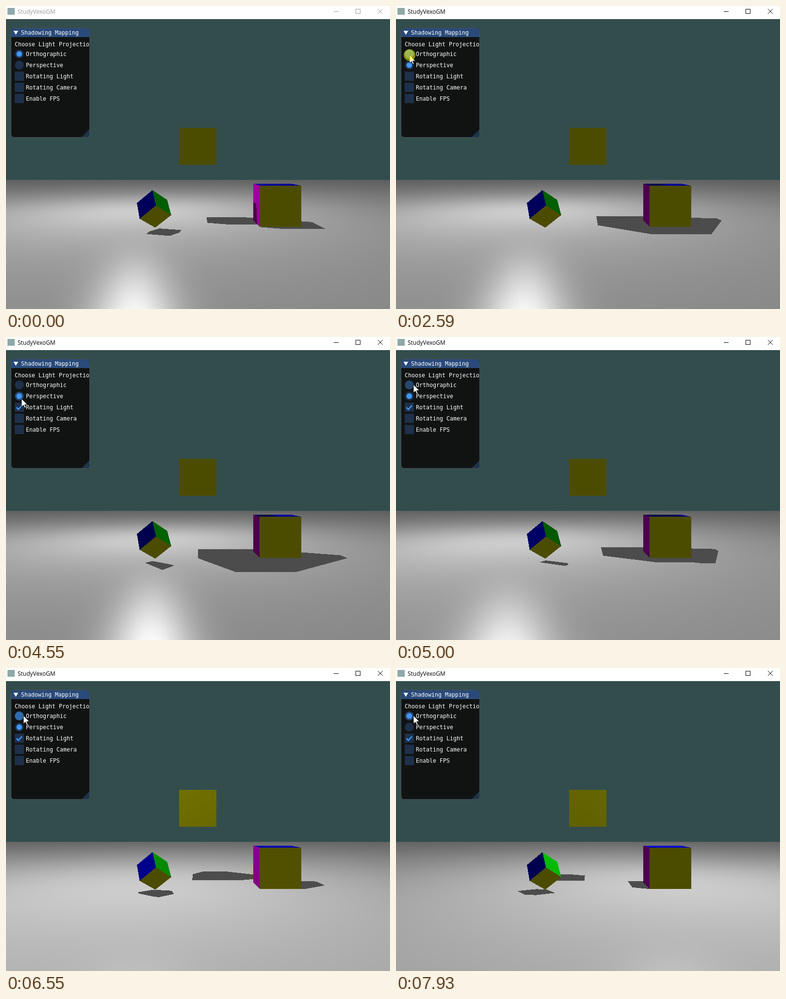
These frames come from a looping animation (792 px wide and 624 px high, 8 s). An HTML page with a canvas:

```html
<!DOCTYPE html>
<html lang="en">
<head>
<meta charset="utf-8">
<title>Shadow demo</title>
<style>
  html, body { margin: 0; width: 100%; height: 100%; overflow: hidden; background: #fff; }
  canvas, svg { position: absolute; left: 0; top: 0; display: block; }
  canvas { top: 27px; }
  .ui text { font: 11.63px "DejaVu Sans Mono", "Liberation Mono", monospace; fill: #fff; white-space: pre; }
  .ui .caption { font: 12px "Open Sans", "Noto Sans", sans-serif; fill: inherit; }
</style>
</head>
<body>
<canvas id="scene" width="792" height="597"></canvas>
<svg class="ui" width="792" height="624" viewBox="0 0 792 624">
  <defs>
    <clipPath id="inside"><rect x="11" y="46" width="160" height="224"/></clipPath>
    <clipPath id="rounded"><rect x="11" y="46" width="161" height="224" rx="6"/></clipPath>
  </defs>
  <rect width="792" height="27" fill="#fff"/>
  <rect x="3" y="4" width="15" height="14" fill="#8fa9a9"/>
  <text id="caption" class="caption" x="24" y="16">StudyVexoGM</text>
  <g id="buttons" fill="none" stroke-width="1">
    <path d="M676 11.5h10"/>
    <rect x="721.5" y="6.5" width="9" height="9"/>
    <path d="M767 6l10 10M777 6l-10 10"/>
  </g>

  <rect x="10.5" y="45.5" width="162" height="225" rx="6.5" fill="#111312" stroke="#494d57"/>
  <g clip-path="url(#rounded)">
    <rect x="11" y="46" width="161" height="18" fill="#294a7a"/>
    <path d="M172 254v16h-16z" fill="#1e344c"/>
  </g>
  <path d="M15.5 51h9.6l-4.8 8.3z" fill="#fff"/>
  <g clip-path="url(#inside)">
    <text x="31" y="59">Shadowing Mapping</text>
    <text x="18" y="83">Choose Light Projection</text>
  </g>
  <g id="rows"></g>
  <circle id="dot" cx="27.4" r="5.8" fill="#4296fa"/>
  <path id="tick" d="M21.5 145l4 4.2 7.5-8.4" fill="none" stroke="#4296fa" stroke-width="2.6"/>
  <path id="arrow" d="M0 0V17L4 13.2 6.6 19 9 18 6.5 12.2H12Z" fill="#fff" stroke="#000" stroke-width=".8"/>
  <circle id="ring" r="12" fill="#ff0" fill-opacity=".52"/>
</svg>

<script>
const LOOP = 8000, W = 792, H = 597, TOP = 27;
const $ = id => document.getElementById(id);

// ---------- scene: three boxes on a floor at y = -0.5 ----------
const FOCAL = 724.3, MID_X = 395.5, MID_Y = 327.4, FLOOR = -0.5;
const eye = [0, 1, 10];
const straight = [[1, 0, 0], [0, 1, 0], [0, 0, 1]];

// Axes turned by an angle about (1,0,1)
function turned(angle) {
  const c = Math.cos(angle), a = (1 + c) / 2, b = (1 - c) / 2, s = Math.sin(angle) * Math.SQRT1_2;
  return [[a, s, b], [-s, c, s], [b, -s, a]];
}
const boxes = [
  { at: [0, 1.5, 0], half: 0.5, axes: straight },
  { at: [2, 0, 1], half: 0.5, axes: straight },
  { at: [-1, 0, 2], half: 0.25, axes: turned(Math.PI / 3) }
];
// Colours by axis: [negative side, positive side]
const paint = [[[1, 0, 1], [0, 1, 0]], [[0, 1, 1], [0, 0, 1]], [[1, 0, 0], [1, 1, 0]]];

const dot3 = (a, b) => a[0] * b[0] + a[1] * b[1] + a[2] * b[2];
const unit = v => { const n = Math.hypot(v[0], v[1], v[2]); return [v[0] / n, v[1] / n, v[2] / n]; };

let tNear, tFar, hitAxis;
// Ray against box; the direction has unit length
function hit(box, px, py, pz, dx, dy, dz) {
  const mx = box.at[0] - px, my = box.at[1] - py, mz = box.at[2] - pz, h = box.half;
  const along = mx * dx + my * dy + mz * dz;
  if (mx * mx + my * my + mz * mz - along * along > 3 * h * h) return false;
  tNear = -1e9; tFar = 1e9;
  for (let i = 0; i < 3; i++) {
    const a = box.axes[i];
    const e = a[0] * mx + a[1] * my + a[2] * mz;
    const f = a[0] * dx + a[1] * dy + a[2] * dz || 1e-9;
    const k = h / Math.abs(f), m = e / f;
    if (m - k > tNear) { tNear = m - k; hitAxis = i; }
    if (m + k < tFar) tFar = m + k;
    if (tNear > tFar) return false;
  }
  return true;
}

const ctx = $("scene").getContext("2d");
const image = ctx.createImageData(W, H);
const bits = image.data;
for (let i = 0; i < bits.length; i += 4) {
  bits[i] = 51; bits[i + 1] = bits[i + 2] = 77; bits[i + 3] = 255;
}

// The camera is fixed, so visible points are found once
const surfaces = [{ normal: [0, 1, 0], color: [1, 1, 1] }];
boxes.forEach(b => b.axes.forEach((a, i) => [-1, 1].forEach((s, side) =>
  surfaces.push({ normal: a.map(v => v * s), color: paint[i][side] }))));

const spots = new Float32Array(W * H * 3);
const kinds = new Int8Array(W * H).fill(-1);
const firstRow = 248 - TOP;

function findVisible() {
  for (let y = firstRow; y < H; y++) for (let x = 0; x < W; x++) {
    const d = unit([x + 0.5 - MID_X, MID_Y - (y + TOP + 0.5), -FOCAL]);
    let best = 1e9, kind = -1;
    if (d[1] < 0) {
      const t = (FLOOR - eye[1]) / d[1];
      if (eye[2] + t * d[2] > -25) { best = t; kind = 0; }
    }
    boxes.forEach((b, i) => {
      if (hit(b, ...eye, ...d) && tNear < best) {
        best = tNear;
        kind = 1 + i * 6 + hitAxis * 2 + (dot3(b.axes[hitAxis], d) < 0 ? 1 : 0);
      }
    });
    if (kind < 0) continue;
    const n = y * W + x;
    kinds[n] = kind;
    for (let k = 0; k < 3; k++) spots[n * 3 + k] = eye[k] + best * d[k];
  }
}

function render(light, perspective) {
  const [lx, ly, lz] = light, sun = unit(light), FAR = 7.5, SPREAD = Math.tan(Math.PI / 8);
  const f = sun.map(v => -v), r = unit([-f[2], 0, f[0]]);
  const u = [-r[2] * f[1], r[2] * f[0] - r[0] * f[2], r[0] * f[1]];

  function shaded(px, py, pz, tx, ty, tz) {
    const vx = px - lx, vy = py - ly, vz = pz - lz;
    const depth = vx * f[0] + vy * f[1] + vz * f[2];
    if (depth > FAR) return false;
    const limit = perspective ? SPREAD * depth : 10;
    if (Math.abs(vx * r[0] + vz * r[2]) > limit) return false;
    if (Math.abs(vx * u[0] + vy * u[1] + vz * u[2]) > limit) return false;
    for (let i = 0; i < 3; i++)
      if (hit(boxes[i], px, py, pz, tx, ty, tz) && tFar > 0.04) return true;
    return false;
  }

  for (let n = firstRow * W; n < W * H; n++) {
    if (kinds[n] < 0) continue;
    const { normal: m, color } = surfaces[kinds[n]];
    const px = spots[n * 3], py = spots[n * 3 + 1], pz = spots[n * 3 + 2];
    let ax = lx - px, ay = ly - py, az = lz - pz;
    const al = Math.sqrt(ax * ax + ay * ay + az * az);
    ax /= al; ay /= al; az /= al;
    const diffuse = m[0] * ax + m[1] * ay + m[2] * az;
    let level = 0.3;
    if (diffuse > 0 && !(perspective ? shaded(px, py, pz, ax, ay, az) : shaded(px, py, pz, sun[0], sun[1], sun[2]))) {
      const ex = eye[0] - px, ey = eye[1] - py, ez = eye[2] - pz;
      const el = Math.sqrt(ex * ex + ey * ey + ez * ez);
      const hx = ax + ex / el, hy = ay + ey / el, hz = az + ez / el;
      const shine = (m[0] * hx + m[1] * hy + m[2] * hz) / Math.sqrt(hx * hx + hy * hy + hz * hz);
      level += 0.5 * (diffuse + Math.pow(Math.max(shine, 0), 64));
    }
    const q = n * 4, v = level * 255;
    bits[q] = color[0] * v; bits[q + 1] = color[1] * v; bits[q + 2] = color[2] * v;
  }
  ctx.putImageData(image, 0, 0);
}

// ---------- panel ----------
const REST = "#1e304a", HOVER = "#25486f", ACTIVE = "#326bad";
const rowY = i => 99 + 23 * i;
$("rows").innerHTML = ["Orthographic", "Perspective", "Rotating Light", "Rotating Camera", "Enable FPS"]
  .map((label, i) => {
    const y = rowY(i);
    const mark = i < 2 ? `<circle cx="27.4" cy="${y - 0.2}" r="9.2"/>`
      : `<rect x="18" y="${y - 10}" width="19" height="19"/>`;
    return `${mark}<text x="41" y="${y + 4}">${label}</text>`;
  }).join("");
const marks = document.querySelectorAll("#rows circle, #rows rect");

// ---------- timeline ----------
const path = [
  [730, 10, 112], [1040, 28, 122], [2220, 28, 122], [2440, 28, 101], [3150, 28, 101], [3370, 28, 122],
  [3700, 28, 122], [3830, 28, 137], [4380, 28, 137], [4550, 32, 127], [4850, 36, 98], [LOOP, 36, 98]
];
const presses = [[1270, 1420], [2513, 2660], [3370, 3520], [4000, 4150], [6540, 6700]];
const RING_DELAY = 72, STEP = 76.9, SPIN_FROM = 4150;

function pointer(t) {
  if (t >= 270 && t < 350) return [60, 437];
  if (t < 730) return null;
  const i = path.findIndex(p => p[0] > t), [t0, x0, y0] = path[i - 1], [t1, x1, y1] = path[i];
  const k = (t - t0) / (t1 - t0);
  return [Math.round(x0 + (x1 - x0) * k), Math.round(y0 + (y1 - y0) * k)];
}

function lightAt(t) {
  if (t < SPIN_FROM) return [-2, 4, -1];
  const held = 3700 + STEP * Math.floor((t - 3700) / STEP + 0.1);
  const a = -2.585 + 0.001012 * (held - 4550);
  return [3 * Math.sin(a), 5 + Math.cos(a), 2 * Math.cos(a)];
}

let drawn = "";
function show(t) {
  const perspective = (t >= 1420 && t < 2660) || (t >= 3520 && t < 6700);
  const light = lightAt(t), key = light + "|" + perspective;
  if (key !== drawn) { render(light, perspective); drawn = key; }

  const ink = t < 1270 ? "#999" : "#000";
  $("caption").style.fill = ink;
  $("buttons").setAttribute("stroke", ink);

  const tip = pointer(t), press = presses.find(p => t >= p[0] && t < p[1]);
  marks.forEach((mark, i) => {
    const over = tip && tip[0] >= 18 && tip[0] < 140 && Math.abs(tip[1] - rowY(i)) <= 9.5;
    mark.setAttribute("fill", over ? (press ? ACTIVE : HOVER) : REST);
  });
  $("dot").setAttribute("cy", rowY(perspective ? 1 : 0) - 0.2);
  $("tick").style.display = t >= SPIN_FROM ? "" : "none";

  const ringOn = press && t >= press[0] + RING_DELAY;
  $("arrow").style.display = tip ? "" : "none";
  $("ring").style.display = ringOn ? "" : "none";
  if (tip) {
    const move = `translate(${tip[0]} ${tip[1]})`;
    $("arrow").setAttribute("transform", move);
    $("ring").setAttribute("transform", move);
  }
}

const start = performance.now();
function tick() {
  show((performance.now() - start) % LOOP);
  requestAnimationFrame(tick);
}
findVisible();
tick();
</script>
</body>
</html>
```
